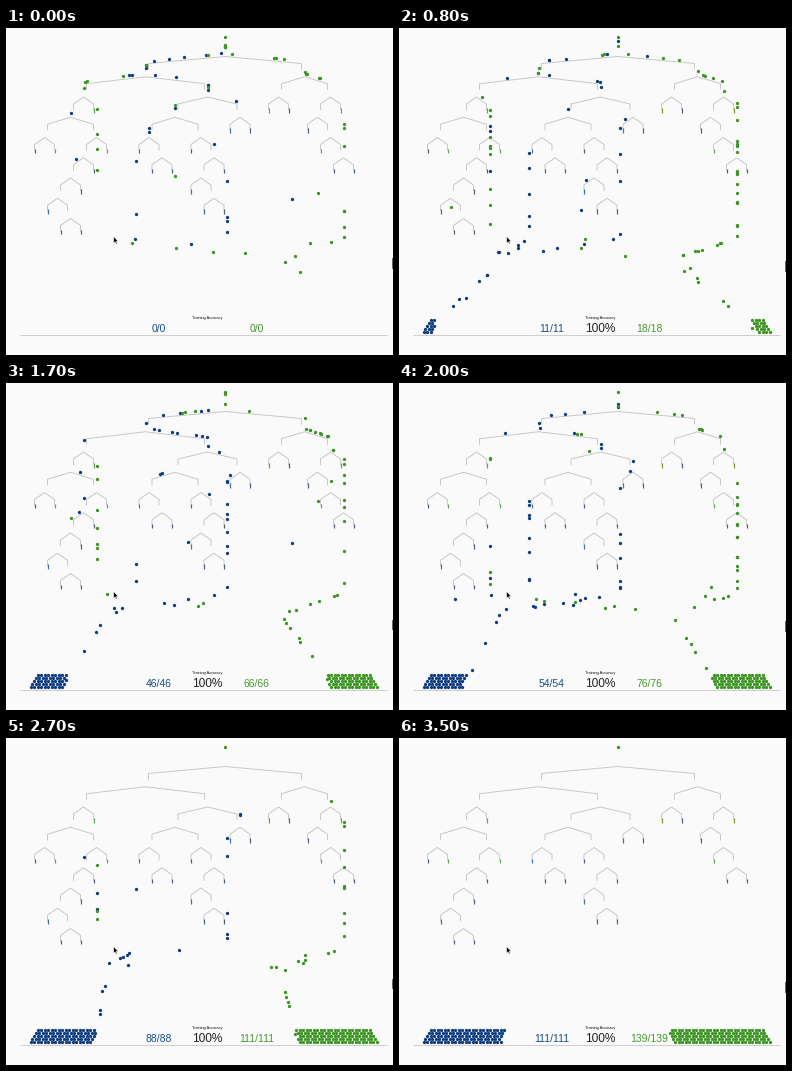
A matplotlib script that plays this animation: 387 by 327 pixels, repeating every 5500 ms.

```python
import numpy as np
import matplotlib.pyplot as plt
from matplotlib.animation import FuncAnimation
from matplotlib.patches import Polygon, Rectangle

W, H, DPI = 387, 327, 100
STEP, FRAMES, STOP = 100, 55, 3500
PX = 72 / DPI
BLUE, GREEN, GREY = "#0f3c80", "#3c9422", "#c4c4c4"

ROOT_X, ROOT_Y, LEVEL = 219, 28.5, 20.25
SPREAD = {"": 79.5, "L": 62, "R": 26, "LR": 32.5, "LLL": 26, "LRL": 26}
NODES = ("", "L", "R", "LL", "LR", "RL", "RR", "LLL", "LRL", "LRR", "RRL",
         "LLLL", "LLLR", "LRLL", "LRLR", "RRLR", "LLLRL", "LRLLR", "LRLRR",
         "RRLRR", "LLLRLL", "LRLRRL", "LLLRLLL", "LRLRRLR", "LLLRLLLR")
GREEN_TIPS = {"LLR", "LLLLR", "LLLRR", "RRR", "RRLRL"}
OLIVE_TIPS = {"RLL", "RRR"}
BLUE_TIPS = {"LRLRRLL", "LLLRLLLL", "LRLLL", "LRRL"}

# Share of dots that leave the tree at each leaf
BLUE_EXITS = {"LRRL": .42, "LRLLL": .24, "LLLRLR": .13, "RLR": .05,
              "LLLRLLLL": .05, "LRLRRLL": .05, "LRLRRR": .06}
GREEN_EXITS = {"RRR": .62, "LLR": .2, "RRLRL": .06, "LLLRLLR": .04,
               "LLLLR": .02, "LRLRL": .04, "LRLLRR": .02}

# Travel time (ms) as a function of height while inside the tree
FALL_Y = (9, 25, 33.5, 45.25, 53.75, 65.5, 210)
FALL_T = (0, 42, 170, 205, 335, 368, 750)
DRIFT_T, TRIP = 985, 1130
LAG = 55


def node_x(path):
    x = ROOT_X
    for i, side in enumerate(path):
        x += SPREAD.get(path[:i], 13) * (1 if side == "R" else -1)
    return x


def node_y(path):
    return ROOT_Y + LEVEL * len(path)


def tree_route(leaf):
    """Way from the top through the tree and down below the given leaf."""
    pts = [(ROOT_X, 9), (ROOT_X, ROOT_Y - 3.5)]
    for i in range(len(leaf)):
        y = node_y(leaf[:i])
        x = node_x(leaf[:i + 1])
        pts += [(x, y + 5), (x, y + LEVEL - 3.5)]
    pts.append((pts[-1][0], 210))
    return pts


class Stream:
    """Dots of one class on their way to one pile."""

    def __init__(self, seed, color, exits, times, counts, gather, base, side):
        rng = np.random.default_rng(seed)
        n = counts[-1]
        self.color = color
        self.arrive = np.interp(np.arange(1, n + 1), counts, times)
        leaves = rng.choice(list(exits), n, p=list(exits.values()))
        land = self.arrive - LAG + rng.uniform(-40, 40, n)
        pace = np.interp(self.arrive, (0, STOP), (1.25, 1))
        self.keys = []
        for i in range(n):
            pts = tree_route(leaves[i])
            ts = list(np.interp([p[1] for p in pts], FALL_Y, FALL_T))
            col, row = divmod(i, 5)
            slot = (base + side * (3.5 * col + 1.75 * row), 304 - 3.1 * row)
            turn = (gather[0] + rng.normal(0, 1.5),
                    gather[1] + rng.normal(0, 1.5))
            xs, ys = np.array(pts + [turn, slot]).T
            ts = np.array(ts + [DRIFT_T, TRIP])
            self.keys.append((land[i] + (ts - TRIP) * pace[i], xs, ys))

    def places(self, t):
        out = []
        for ts, xs, ys in self.keys:
            if t < ts[0]:
                out.append((np.nan, np.nan))
            else:
                out.append((np.interp(t, ts, xs), np.interp(t, ts, ys)))
        return np.array(out)

    def count(self, t):
        return int(np.sum(self.arrive <= t + 1e-6))


blue = Stream(4, BLUE, BLUE_EXITS, (400, 800, 1300, 1700, 2300, 2700, 3500),
              (0, 11, 30, 46, 63, 88, 111), (103, 229), 24.5, 1)
green = Stream(9, GREEN, GREEN_EXITS, (180, 800, 1300, 1700, 2300, 2700, 3500),
               (0, 18, 39, 66, 87, 111, 139), (276, 231), 370.5, -1)

fig = plt.figure(figsize=(W / DPI, H / DPI), dpi=DPI, facecolor="#fafafa")
ax = fig.add_axes([0, 0, 1, 1])
ax.set_xlim(0, W)
ax.set_ylim(H, 0)
ax.axis("off")


def stroke(xs, ys, color=GREY, width=0.9):
    ax.plot(xs, ys, color=color, lw=width * PX, zorder=1,
            solid_capstyle="butt", solid_joinstyle="miter")


def label(x, y, text, size, color):
    return ax.text(x, y, text, fontsize=size * PX, color=color,
                   family="Liberation Sans", ha="center", va="baseline")


def tip_color(leaf):
    if leaf in OLIVE_TIPS:
        return "#7f9a2c"
    if leaf in GREEN_TIPS:
        return "#62a45c"
    if leaf in BLUE_TIPS:
        return "#3d74ad"
    return "#4a5f78"


def draw_tree():
    for node in NODES:
        x, y = node_x(node), node_y(node)
        reach = SPREAD.get(node, 13) - 3
        stroke([x - reach, x - reach, x, x + reach, x + reach],
               [y + 13, y + 7, y, y + 7, y + 13])
        for side, dx in (("L", -reach), ("R", reach)):
            if node + side not in NODES:
                stroke([x + dx] * 2, [y + 11, y + 15.5],
                       tip_color(node + side), 1.2)


def draw_pointer(x, y):
    shape = [(0, 0), (0, 6.2), (1.4, 5), (2.4, 7.4), (3.4, 7), (2.5, 4.7),
             (4.3, 4.6)]
    ax.add_patch(Polygon([(x + a, y + b) for a, b in shape], fc="black",
                         ec="white", lw=0.4 * PX, zorder=6))


def dots(color):
    return ax.scatter([], [], s=(3.3 * PX) ** 2, c=color, lw=0, zorder=4)


draw_tree()
stroke([14, 381], [307, 307], "#cfcfcf", 1)
draw_pointer(107.7, 208.7)
label(201.5, 291.3, "Training Accuracy", 3.9, "#111111")
score = label(201.5, 304, "", 11.9, "#222222")
tallies = [label(152.5, 304, "", 10.4, "#174f8c"),
           label(250.5, 304, "", 10.4, "#459a2e")]
streams = [blue, green]
clouds = [dots(s.color) for s in streams]
ax.scatter([ROOT_X], [9], s=(3.3 * PX) ** 2, c=GREEN, lw=0, zorder=5)
edge = ax.add_patch(Rectangle((385.6, 230), 1.4, 10.5, fc="#666666", lw=0))


def update(i):
    t = min(i * STEP, STOP)
    total = 0
    for stream, cloud, tally in zip(streams, clouds, tallies):
        n = stream.count(t)
        total += n
        cloud.set_offsets(stream.places(t))
        tally.set_text(f"{n}/{n}")
    score.set_text("100%" if total else "")
    edge.set_y(230 + 0.004 * t)
    return [*clouds, *tallies, score, edge]


anim = FuncAnimation(fig, update, frames=FRAMES, interval=STEP,
                     init_func=lambda: update(0), repeat=True,
                     repeat_delay=0, blit=False)
plt.show()
```
